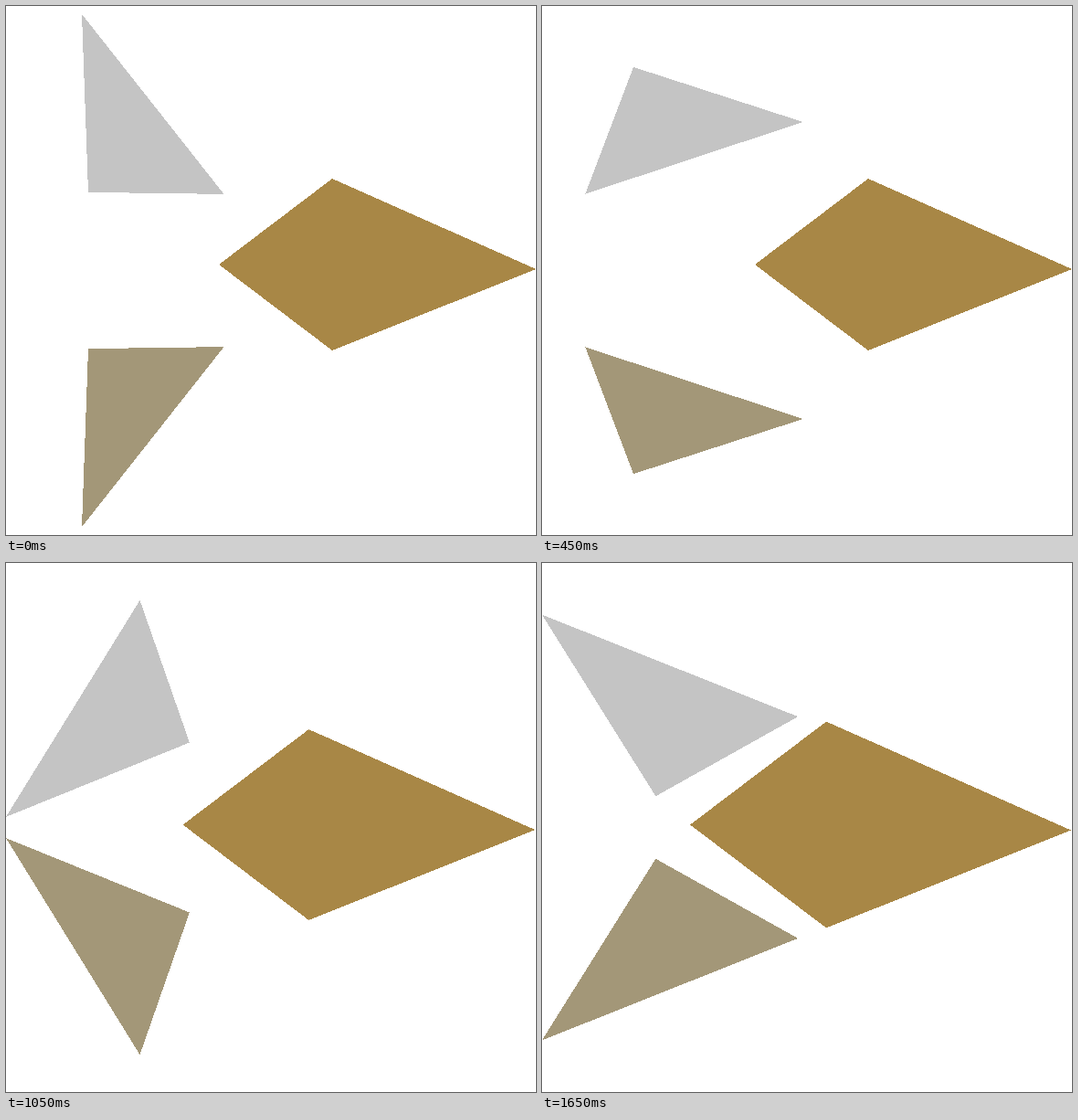
Write an HTML page that moves like this. It is 580x579 px and loops after 1800 ms.

```html
<!DOCTYPE html>
<html lang="en">
<head>
<meta charset="utf-8">
<title>Turning wings</title>
<style>
  html, body { margin: 0; width: 100%; height: 100%; overflow: hidden; background: #fff; }
  svg { display: block; width: 100%; height: 100%; }
</style>
</head>
<body>
<svg viewBox="0 0 580 579" shape-rendering="crispEdges">
  <polygon id="upper" fill="#c4c4c4"/>
  <polygon id="lower" fill="#a39778"/>
  <polygon id="kite" fill="#a88746"/>
</svg>
<script>
const STEP = 150, STEPS = 12, SPREAD_STEPS = 7;
const AXIS = 289.5, EDGE = 579;

// Shapes at size 1: wing around its hub, kite from its right tip
const WING = [[-60, -130], [95.5, 67], [-53, 65]];
const KITE = [[-347, 0], [-223, -94], [0, 5], [-223, 94]];

// Turn of the wings in degrees at key steps
const TURNS = [[0, 0], [1, 30], [3, 110], [5, 210], [11, 330]];

// The spread layout repeats these four placings
const SPREAD = [
  { size: 1, tip: 580, hub: 143 },
  { size: 0.986, tip: 570, hub: 138 },
  { size: 1.034, tip: 570, hub: 115 },
  { size: 1, tip: 580, hub: 143 }
];

const shape = id => document.getElementById(id);
const upper = shape("upper"), lower = shape("lower"), kite = shape("kite");
const setPoints = (el, pts) => el.setAttribute("points", pts.join(" "));

function lerpKeys(keys, x) {
  const i = keys.findIndex(([k], n) => n > 0 && x <= k);
  const [x0, y0] = keys[i - 1], [x1, y1] = keys[i];
  return y0 + (y1 - y0) * (x - x0) / (x1 - x0);
}

function rotate(pts, degrees) {
  const a = degrees * Math.PI / 180, c = Math.cos(a), s = Math.sin(a);
  return pts.map(([x, y]) => [x * c - y * s, x * s + y * c]);
}

const place = (pts, size, cx, cy) => pts.map(([x, y]) => [cx + size * x, cy + size * y]);

// The compact layout closes in on the kite and always fills the width
function compact(wing, n) {
  const left = Math.min(...wing.map(([x]) => x));
  const reach = Math.max(365, 427 - 7.3 * n * n);
  const size = EDGE / (reach - left);
  return { size, tip: EDGE, hub: -left * size, gap: 111.3, mid: 286.5 };
}

function draw(time) {
  const step = Math.floor(time / STEP) % STEPS;
  const wing = rotate(WING, lerpKeys(TURNS, step));
  const { size, tip, hub, gap, mid } = step < SPREAD_STEPS
    ? { ...SPREAD[step % 4], gap: 150.6, mid: 283 }
    : compact(wing, step - SPREAD_STEPS + 1);

  const pts = place(wing, size, hub, AXIS - gap * size);
  setPoints(upper, pts);
  setPoints(lower, pts.map(([x, y]) => [x, 2 * AXIS - y]));
  setPoints(kite, place(KITE, size, tip, mid));
}

const start = performance.now();
function tick(now) {
  draw(Math.max(0, now - start));
  requestAnimationFrame(tick);
}
draw(0);
requestAnimationFrame(tick);
</script>
</body>
</html>
```
